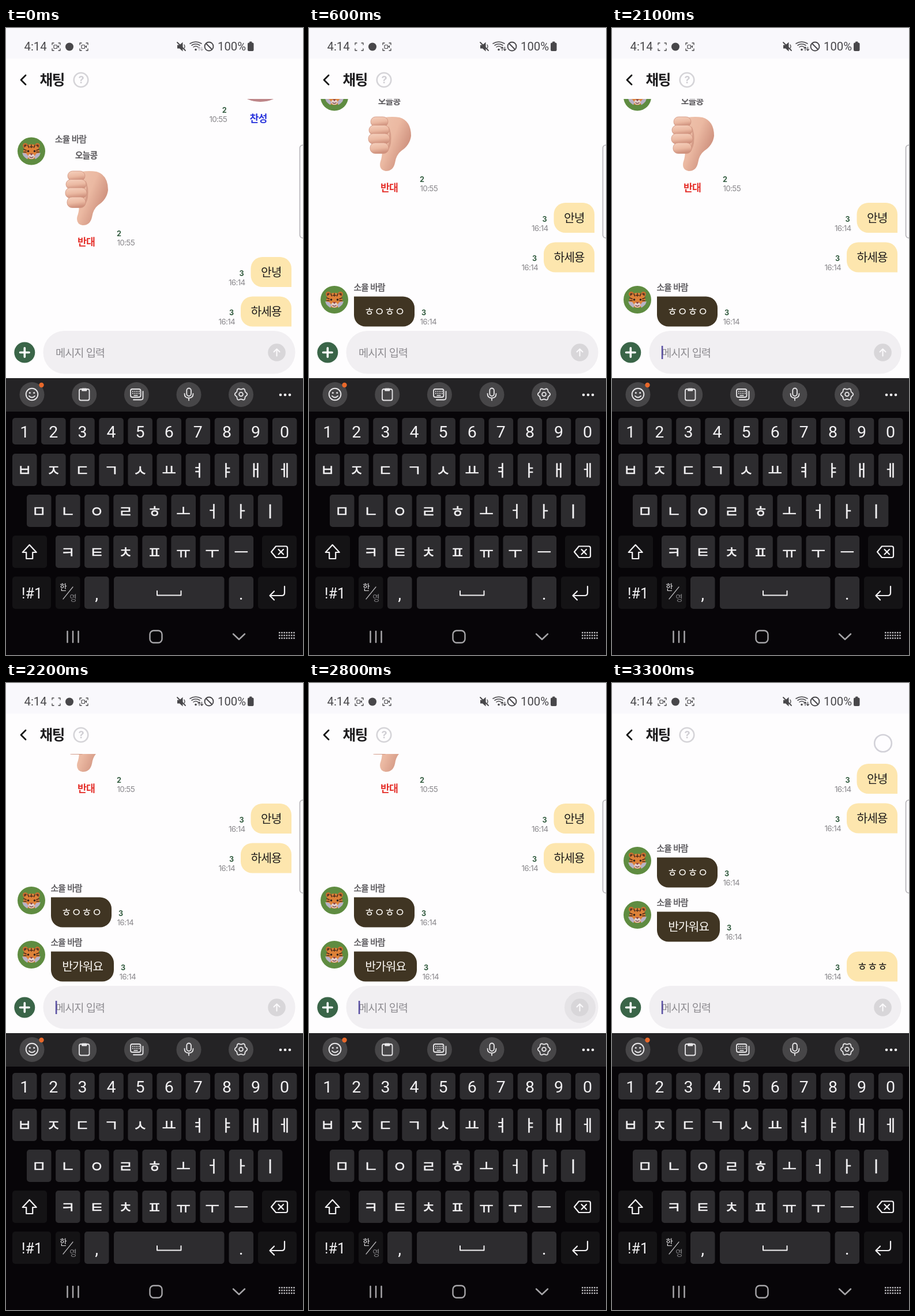
An HTML page for the animation above (3400 ms loop, 515x1087 px).

```html
<!DOCTYPE html>
<html lang="ko">
<head>
<meta charset="utf-8">
<title>채팅</title>
<style>
html, body { margin: 0; width: 100%; height: 100%; overflow: hidden; background: #fefdfe; }
svg { display: block; width: 515px; height: 1087px; }
.ko { font-family: "Noto Sans CJK KR", "Noto Sans CJK", "Noto Sans CJK JP", sans-serif; letter-spacing: -.055em; }
.num { font-family: Inter, sans-serif; letter-spacing: -.05em; }
.sys { font-family: Roboto, sans-serif; }
.key { font-family: Roboto, "Noto Sans CJK KR", "Noto Sans CJK", sans-serif; }
</style>
</head>
<body>
<svg id="stage" viewBox="0 0 515 1087" xmlns="http://www.w3.org/2000/svg"></svg>
<script>
const LOOP = 3400;
const GREEN = '#3a6548', YELLOW = '#fde6ae', BROWN = '#403523', KEY = '#2d2c2f', DARK = '#141315';

const rect = (x, y, w, h, fill, r = 0, more = '') =>
  `<rect x="${x}" y="${y}" width="${w}" height="${h}" rx="${r}" fill="${fill}" ${more}/>`;
const circle = (x, y, r, fill, more = '') =>
  `<circle cx="${x}" cy="${y}" r="${r}" fill="${fill}" ${more}/>`;
const oval = (x, y, rx, ry, fill, more = '') =>
  `<ellipse cx="${x}" cy="${y}" rx="${rx}" ry="${ry}" fill="${fill}" ${more}/>`;
const line = (d, color, w = 2, more = '') =>
  `<path d="${d}" fill="none" stroke="${color}" stroke-width="${w}" stroke-linecap="round" stroke-linejoin="round" ${more}/>`;
const shape = (d, fill, more = '') => `<path d="${d}" fill="${fill}" ${more}/>`;
const group = (id, body, more = '') => `<g id="${id}" ${more}>${body}</g>`;

// y is the optical middle of the line; weight 500 is a regular face with a thin outline
const text = (s, x, y, size, fill, cls = 'ko', anchor = 'start', weight = 400) =>
  `<text class="${cls}" x="${x}" y="${y + size * (cls === 'ko' ? .38 : .358)}" font-size="${size}" ` +
  `fill="${fill}" text-anchor="${anchor}" ` +
  (weight === 500 ? `stroke="${fill}" stroke-width=".5"` : `font-weight="${weight}"`) + `>${s}</text>`;

function statusBar() {
  const ink = '#48474a';
  const corners = x => line(
    `M${x - 7} 29V26h3M${x + 4} 26h3V29M${x + 7} 36V39h-3M${x - 4} 39h-3V36`, ink, 1.3);
  const camera = x => rect(x - 4, 29.5, 5.5, 6, 'none', 1, `stroke="${ink}" stroke-width="1.2"`) +
    shape(`M${x + 2} 32l3-2v5z`, ink);
  const wifi = [10, 7, 4].map(r =>
    line(`M${329 - r} ${37 - r}Q329 ${36 - r * 1.5} ${329 + r} ${37 - r}`, ink, 1.5)).join('');
  return rect(0, 0, 515, 53, '#f9f8fc') +
    text('4:14', 31.5, 32, 20.3, ink, 'sys') +
    corners(87) + group('rec', camera(87)) +
    circle(110, 32.5, 7, ink) +
    corners(135) + camera(135) +
    shape('M297 29.5h4l5.500-5v16l-5.500-5h-4z', ink) +
    line('M297 25l14 14', ink, 1.8) + line('M309 29q2 3 0 6', ink, 1.3) +
    wifi + circle(329, 37.5, 1.8, ink) +
    group('data', line('M335 39v-6m-2 2l2-2 2 2M339.500 33v6m-2-2l2 2 2-2', ink, 1.2)) +
    circle(352, 32, 7.5, 'none', `stroke="${ink}" stroke-width="1.9"`) +
    line('M347 27l10 10', ink, 1.9) +
    text('100%', 367, 32, 20.3, ink, 'sys') +
    rect(419, 25.5, 10.5, 14.5, ink, 2) + rect(422, 23.5, 4.5, 3, ink, 1);
}

function header() {
  return line('M34 82l-8 8 8 8', '#111', 2.8) +
    text('채팅', 58.5, 90, 24.6, '#1c1b1d', 'ko', 'start', 600) +
    circle(130, 90, 12.3, 'none', 'stroke="#d5d4d8" stroke-width="2.6"') +
    text('?', 130, 90, 18, '#d0cfd4', 'num', 'middle', 700) +
    group('spin', circle(470, 104.5, 14.8, '#fefdff', 'stroke="#d2d1d8" stroke-width="2.6"'));
}

function tiger(cy) {
  const both = make => [-1, 1].map(make).join('');
  const ears = both(s =>
    circle(44 + s * 10.5, cy - 9.5, 4.5, '#c96f30') + circle(44 + s * 10.5, cy - 9, 2.4, '#5b3825'));
  const cheeks = both(s => {
    const x = 44 + s * 9;
    return shape(`M${x} ${cy + 4}L${x + s * 7} ${cy + 3}L${x + s * 5} ${cy + 8}L${x + s * 2} ${cy + 11}L${x - s * 2} ${cy + 14}L${x - s * 4} ${cy + 9}Z`, '#b9b2c6');
  });
  const marks = both(s =>
    circle(44 + s * 5.5, cy, 1.8, '#2c201d') +
    line(`M${44 + s * 13} ${cy - 3}l${-s * 4} 1.500M${44 + s * 13} ${cy + 1.5}l${-s * 4} 0M${44 + s * 6} ${cy - 10}l${-s * 1.5} 3.500`, '#4a2b1c', 1.7));
  return circle(44, cy, 24, '#5f8c41') + ears +
    oval(44, cy + 1, 14, 13, '#dd8138') + cheeks + marks +
    line(`M44 ${cy - 11}v5M41.500 ${cy - 7.500}h5`, '#4a2d1d', 1.5) +
    oval(44, cy + 9, 5.5, 4.5, '#e3cfcb') +
    shape(`M41 ${cy + 4}h6l-3 3.500z`, '#8c4040') +
    line(`M41 ${cy + 10}q3 2.500 6 0`, '#7a4040', 1.3);
}

function thumbDown() {
  const fingers = [[107, 248, 30, 17], [104, 262.5, 35, 17], [103, 277, 37, 18], [106, 293, 32, 18.5]];
  return shape('M116 253Q136 246 157 249Q177 255 177 281Q175 297 160 307Q151 314 149 328Q146 342 133 342Q121 340 123.500 327Q128 314 126 306L112 296Z', 'url(#skin)') +
    shape('M138 264Q142 290 134 309Q140 304 142 294Q144 276 138 264Z', '#c07f6e', 'opacity=".5"') +
    fingers.map(([x, y, w, h]) =>
      rect(x, y, w, h, 'url(#finger)', 8.5, 'stroke="#cf917d" stroke-width=".8"')).join('');
}

const count = (n, x, y, anchor) => text(n, x, y, 12.6, '#335c40', 'num', anchor, 700);
const clock = (s, x, y, anchor) => text(s, x, y, 13.5, '#89878b', 'num', anchor);
const sender = (x, y) => text('소율 바람', x, y, 14.7, '#59575b', 'ko', 'start', 500);

function sent(s, x, y) {
  const w = 495 - x;
  return shape(`M${x + 20} ${y}h${w - 40}a20 20 0 0 1 20 20v32h${20 - w}a20 20 0 0 1-20-20v-12a20 20 0 0 1 20-20z`, YELLOW) +
    text(s, x + w / 2, y + 26, 20.4, '#1f1d1c', 'ko', 'middle') +
    count(3, x - 12.5, y + 28, 'end') + clock('16:14', x - 10, y + 44, 'end');
}

function received(s, w, y) {
  return tiger(y + 5.5) + sender(77.5, y - 16) +
    shape(`M78 ${y}h${w - 20}a20 20 0 0 1 20 20v12a20 20 0 0 1-20 20h${40 - w}a20 20 0 0 1-20-20z`, BROWN) +
    text(s, 78 + w / 2, y + 26, 20.4, '#fbf8f3', 'ko', 'middle') +
    count(3, 78 + w + 12, y + 28) + clock('16:14', 78 + w + 9.5, y + 44);
}

function messages() {
  return oval(441, 113, 31, 15, '#bd8588') +
    text('찬성', 437.5, 156, 17.3, '#2a35dc', 'ko', 'middle', 700) +
    count(2, 382, 142.5, 'end') + clock('10:55', 383, 158.5, 'end') +
    tiger(213.5) + sender(85, 192) +
    text('오늘콩', 139, 220.5, 14.9, '#555357', 'ko', 'middle', 600) +
    thumbDown() +
    text('반대', 139, 370, 17.3, '#e5322d', 'ko', 'middle', 700) +
    count(2, 192, 356) + clock('10:55', 192.5, 372) +
    sent('안녕', 424.5, 397) + sent('하세용', 407, 465.5) +
    received('ㅎㅇㅎㅇ', 105, 559.5) + received('반가워요', 109, 653.5) +
    sent('ㅎㅎㅎ', 407, 722.5);
}

function inputBar() {
  const caret = (id, x) => rect(x, 551, 2.6, 23, '#5b51a3', 0, `id="${id}"`);
  return circle(32.3, 562.5, 18, GREEN) + line('M24.500 562.500h15.600M32.300 554.700v15.600', '#fff', 3.6) +
    rect(64.5, 525, 437, 74.5, '#f1eff2', 37) +
    group('ripple', circle(470, 562.5, 27, '#e5e3e6')) +
    circle(469.5, 562.5, 15.3, '#d8d6d9', 'id="send"') +
    line('M469.500 568.500v-12m-5 5l5-5 5 5', '#fbfafc', 2) +
    group('hint', text('메시지 입력', 86, 562.5, 18.7, '#8d8b90')) +
    group('typed', text('ㅎㅎㅎ', 85.5, 562.5, 18.4, '#1d1c1f') +
      rect(86, 571.3, 47, 1.4, '#2c2b2e') + caret('caretEnd', 132.5)) +
    caret('caret', 85.8);
}

function toolbar() {
  const ink = '#e9e8ea';
  const box = (x, y, w, h, r) => rect(x, y, w, h, 'none', r, `stroke="${ink}" stroke-width="1.8"`);
  let gear = '';
  for (let i = 0; i <= 72; i++) {
    const a = i * Math.PI / 36, r = 9.6 + 1.1 * Math.cos(6 * a);
    gear += `${i ? 'L' : 'M'}${(407.5 + r * Math.cos(a)).toFixed(1)} ${(635 + r * Math.sin(a)).toFixed(1)}`;
  }
  let dots = '';
  for (let i = 0; i < 8; i++) dots += rect(219 + i % 4 * 3.6, 629 + (i >> 2) * 3.6, 1.8, 1.8, ink);
  const icons = [45, 135.7, 226.4, 317, 407.5].map(x => circle(x, 635.5, 21.5, '#474648')).join('') +
    circle(45, 635, 10.3, 'none', `stroke="${ink}" stroke-width="1.9"`) +
    circle(41.3, 632.5, 1.5, ink) + circle(48.7, 632.5, 1.5, ink) + line('M40 638q5 5 10 0', ink, 1.8) +
    circle(61.5, 619, 4.2, '#e8682a') +
    box(127, 626, 17.5, 19.5, 3) + rect(131, 624.5, 9.5, 5, ink, 1.5) +
    box(216, 626, 17.5, 14, 3) + dots + rect(221.5, 636.3, 7, 1.6, ink) +
    line('M237.500 630v11q0 3.500-3.500 3.500h-13', ink, 1.8) +
    box(313.3, 624.5, 7.6, 13.5, 3.8) + line('M309.500 634q0 7.500 7.500 7.500t7.500-7.500M317 641.500v4', ink, 1.8) +
    line(gear + 'Z', ink, 1.8) + circle(407.5, 635, 3.4, 'none', `stroke="${ink}" stroke-width="1.8"`);
  const words = line('M35 626l-10.500 10.500 10.500 10.500', ink, 2) +
    circle(388, 636, 11, '#5c5420', 'opacity=".45"') +
    [['ㅎ', 127], ['흠', 257], ['ㅎㅇ', 387]].map(([s, x]) =>
      text(s, x, 636, 20, ink, 'ko', 'middle')).join('');
  return rect(0, 607, 515, 58, '#242325') + group('icons', icons) + group('words', words) +
    [476, 484, 492].map(x => circle(x, 636, 2.3, '#f4f3f5')).join('');
}

function keyboard() {
  const ink = '#f3f2f4', step = 50.1;
  const row = (chars, x, y, h, size, weight) => [...chars].map((c, i) =>
    rect(x + i * step, y, 42.5, h, KEY, 5) +
    text(c, x + i * step + 21.2, y + h / 2 + 1, size, ink, 'key', 'middle', weight)).join('');
  const jamo = (chars, x, y) => row(chars, x, y, 56, 27, 500);
  let dots = '';
  for (let i = 0; i < 21; i++) dots += rect(473 + i % 7 * 4.2, 1047 + Math.floor(i / 7) * 4.8, 2.5, 2.5, '#bcbbbe');
  const nav = '#a6a5a8';
  return rect(0, 607, 515, 480, '#070508') + toolbar() +
    row('1234567890', 11, 676, 46, 28.5) +
    jamo('ㅂㅈㄷㄱㅅㅛㅕㅑㅐㅔ', 11, 738) +
    jamo('ㅁㄴㅇㄹㅎㅗㅓㅏㅣ', 36, 809) +
    jamo('ㅋㅌㅊㅍㅠㅜㅡ', 86, 880) +
    rect(11, 880, 60, 56, DARK, 5) + rect(444, 880, 60, 56, DARK, 5) +
    line('M40.700 896l12 13h-6.500v11h-11v-11h-6.500z', ink, 2.2) +
    line('M468 898.500h17q3 0 3 3v13.500q0 3-3 3h-17l-8-9.750zM472.500 904l8.500 8.500m0-8.500l-8.500 8.500', ink, 2.2) +
    rect(11, 951, 67, 56, DARK, 5) + text('!#1', 45, 980, 25, ink, 'key', 'middle') +
    rect(86, 951, 42.5, 56, DARK, 5) +
    text('한', 99, 969, 13.5, ink, 'ko', 'middle') + text('영', 116, 988, 13.5, '#858487', 'ko', 'middle') +
    line('M99 990l17-21', '#b8b7ba', 1.2) +
    row(',', 136, 951, 56, 30) + rect(187, 951, 191.5, 56, KEY, 5) +
    line('M262 976v7.500h41.500v-7.500', ink, 2) +
    row('.', 386.5, 951, 56, 30) +
    rect(437, 951, 67, 56, DARK, 5) +
    line('M483 968v11q0 5-5 5h-20m7-7.500l-7.500 7.500 7.500 7.500', ink, 2.2) +
    line('M106.500 1046v19M116 1046v19M125.500 1046v19', nav, 2.5) +
    rect(249.5, 1044.7, 21, 21, 'none', 6.5, `stroke="${nav}" stroke-width="2.4"`) +
    line('M394 1050.500l10 9.500 10-9.500', nav, 2.5) + dots;
}

const stage = document.getElementById('stage');
stage.innerHTML = `<defs>
  <clipPath id="view"><rect x="0" y="123" width="515" height="400"/></clipPath>
  <linearGradient id="skin" x1="0" y1="0" x2="1" y2=".6">
    <stop offset="0" stop-color="#f0c6b0"/><stop offset=".55" stop-color="#ebb9a2"/><stop offset="1" stop-color="#c98977"/>
  </linearGradient>
  <linearGradient id="finger" x1="0" y1="0" x2=".25" y2="1">
    <stop offset="0" stop-color="#f6d1be"/><stop offset=".6" stop-color="#ebb9a2"/><stop offset="1" stop-color="#cf917d"/>
  </linearGradient></defs>` +
  rect(0, 0, 515, 1087, '#fefdfe') + statusBar() + header() +
  `<g clip-path="url(#view)">${group('list', messages())}</g>` +
  rect(509.5, 203, 12, 161, '#fbfafc', 5, 'stroke="#b5b3b8" stroke-width="1.6"') +
  inputBar() + keyboard();

const part = id => document.getElementById(id);
const show = (id, on) => part(id).setAttribute('visibility', on ? 'visible' : 'hidden');
const within = (t, a, b) => t >= a && t < b;

// [start time, list offset]
const scrolls = [[0, 0], [600, 94], [2200, 188], [3000, 257]];
const carets = [[100, 600], [1000, 1500], [2000, 2600], [2800, LOOP]];

function draw(t) {
  const offset = scrolls.filter(s => t >= s[0]).pop()[1];
  const typing = within(t, 2600, 2800);
  part('list').setAttribute('transform', `translate(0 ${-offset})`);
  show('rec', !within(t, 100, 2700));
  part('data').setAttribute('opacity', t < 600 ? .4 : 1);
  show('spin', t >= 3200);
  show('typed', typing);
  show('caretEnd', typing);
  show('hint', !typing);
  show('caret', carets.some(([a, b]) => within(t, a, b)));
  show('words', typing);
  show('icons', !typing);
  show('ripple', within(t, 2800, 3000));
  part('send').setAttribute('fill', typing ? GREEN : '#d8d6d9');
}

const start = performance.now();
function tick() {
  draw((performance.now() - start) % LOOP);
  requestAnimationFrame(tick);
}
tick();
</script>
</body>
</html>
```
